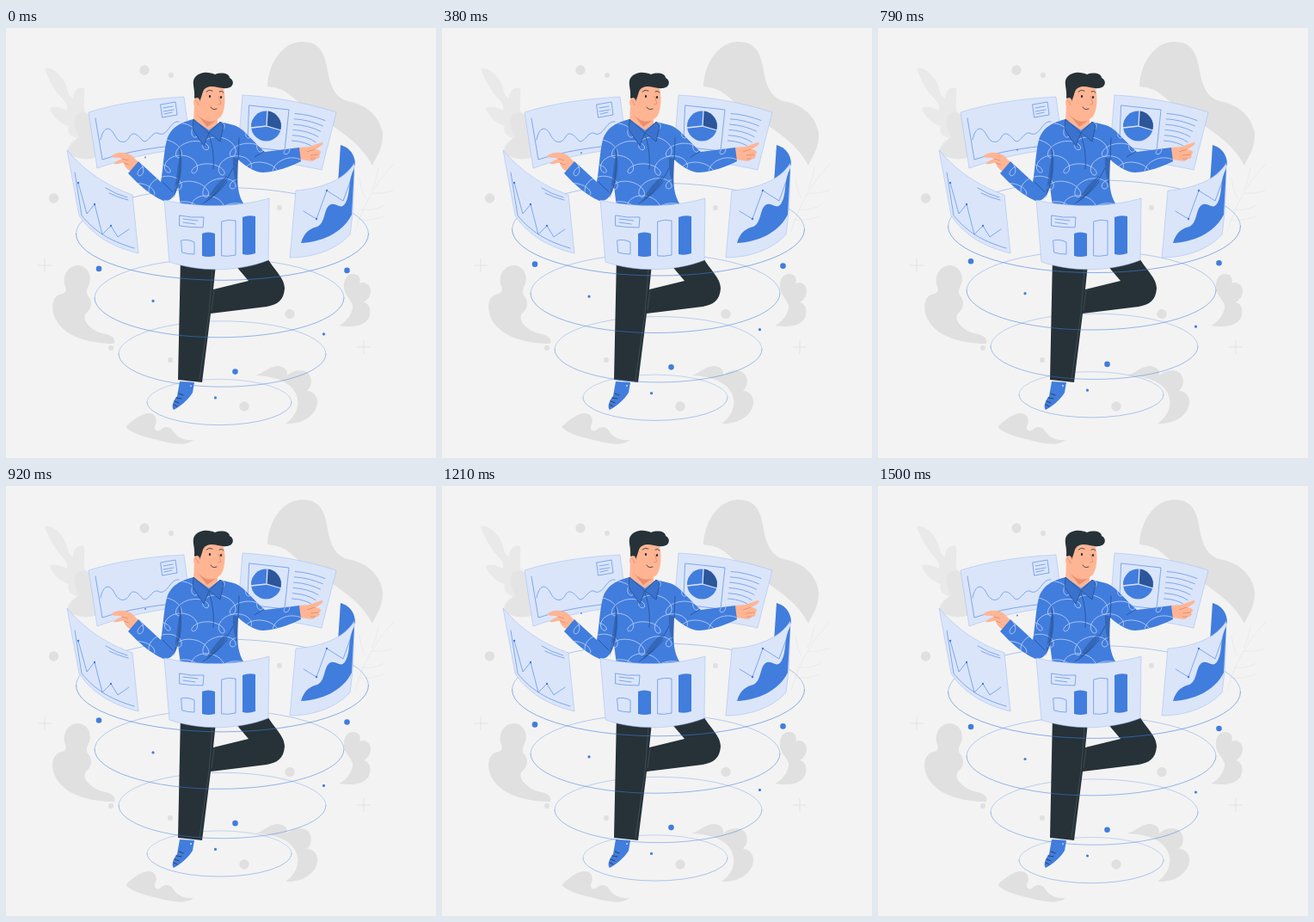
Write an HTML page that moves like this. It is 500x500 px and loops after 1540 ms.

```html
<!DOCTYPE html>
<html lang="en">
<head>
<meta charset="utf-8">
<title>Dashboard rings</title>
<style>
  html, body { margin: 0; height: 100%; overflow: hidden; background: #f3f3f3; }
  svg { display: block; width: 100vw; height: 100vh; }
  .panel { fill: #dae5fa; stroke: #9bb9ee; stroke-width: .5; }
  .line { fill: none; stroke: #417ddd; stroke-width: .6; stroke-linejoin: round; stroke-linecap: round; }
  .dots { fill: none; stroke: #417ddd; stroke-linecap: round; }
  .blue { fill: #417ddd; }
  .shade { fill: #2c5699; }
  .skin { fill: #ffb594; }
  .dark { fill: #263238; }
  .ink { fill: none; stroke: #263238; stroke-width: .8; stroke-linecap: round; }
  .crease { fill: none; stroke: #24518f; stroke-width: .8; stroke-linecap: round; }
  .blush { fill: none; stroke: #dd8368; stroke-width: .7; }
</style>
</head>
<body>
<svg viewBox="0 0 500 500" xmlns="http://www.w3.org/2000/svg">
  <clipPath id="shirtClip"><use href="#shirt"/></clipPath>

  <!-- Backdrop -->
  <g fill="#e0e0e0">
    <path d="M304 68C305 40 322 17 343 16C365 15 371 30 374 50C377 70 385 82 397 85C416 88 434 100 438 122C439 140 430 150 426 160C420 148 408 134 394 124C376 110 350 96 333 80C322 70 312 69 304 68Z"/>
    <path d="M126 367C100 367 75 361 62 345C50 330 52 310 66 309C70 307 71 304 68 298C66 285 74 276 84 276C95 277 100 288 97 297C94 304 92 308 96 312C102 320 98 328 93 332C87 340 100 352 112 355C122 357 128 360 126 367Z"/>
    <path d="M387 346C396 342 402 333 403 325C404 318 394 312 393 303C392 292 397 286 403 286C411 286 413 292 411 297C418 294 424 299 424 306C424 313 420 316 416 319C424 321 425 330 422 337C416 348 400 348 387 346Z"/>
    <path d="M290 404C300 401 305 394 315 393C324 393 328 398 327 404C336 396 350 397 353 404C357 411 354 418 350 422C358 422 363 429 362 437C360 450 346 461 325 460C337 452 343 438 337 425C330 410 310 405 290 404Z"/>
    <path d="M139 464C148 455 158 448 166 448C174 448 177 456 173 463C172 468 176 470 180 467C184 463 190 463 194 468C198 476 208 480 218 479C210 486 195 484 180 480C165 476 150 474 139 464Z"/>
  </g>
  <g class="dots" style="stroke:#e0e0e0">
    <path stroke-width="11.4" d="M161 49h0M55.5 198h0M330 332.5h0M277 440h0"/>
    <path stroke-width="6" d="M192 55h0M318 209h0M122 372h0M191 386h0"/>
  </g>
  <path fill="#e9e9e9" d="M45 47C52 44 67 55 71 70C72 77 75 81 78 82C78 73 84 68 91 70C92 79 90 87 91 96C97 101 104 110 105 150C94 155 79 152 72 145C70 137 78 131 83 128C73 126 71 119 73 114C64 112 54 103 51 93C57 90 65 93 71 96C73 88 66 83 60 76C53 66 48 57 45 47Z"/>
  <path fill="#e4e4e4" d="M83 100C92 96 99 100 104 110L106 150C94 155 77 151 72 143C75 135 80 131 86 127C78 118 78 106 83 100Z"/>
  <g fill="none" stroke="#ebebeb">
    <path d="M451 158C430 180 416 204 406 237M425 188C429 181 432 171 433 162M418 198C414 191 412 182 411 174M425 192C435 193 445 191 451 188M413 211C423 212 432 211 440 206M409 223C419 224 429 223 439 219"/>
    <path stroke="#dfdfdf" stroke-width=".8" d="M37 276h16m-8-8v16M408 371h16m-8-8v16"/>
  </g>

  <g class="float" id="backRings"></g>

  <!-- Rear panels -->
  <path class="panel" d="M96 98C130 87 170 82 207 80L215 140C175 143 140 151 106 163Z"/>
  <path class="line" d="M104 105L112 153C140 144 170 139 204 136M110 130C113 114 121 114 126 124C132 136 140 134 144 126C148 119 155 126 158 130C164 137 169 121 176 122C188 129 190 107 201 109M180 89L197 86L199 101L182 104ZM183 93L194 91M183 97L195 95M184 100L193 98"/>
  <path class="panel" d="M275 78C312 80 350 87 384 98L367 165C335 158 304 153 269 151Z"/>
  <path class="line" d="M283 90L329 95L324 143L281 138Z"/>
  <path class="line" id="textLines"/>
  <circle class="blue" cx="302.5" cy="114" r="17.5"/>
  <path class="shade" d="M303 114L304 96.500A17.500 17.500 0 0 1 319 119Z"/>
  <path fill="none" stroke="#dae5fa" stroke-width="1.300" d="M304 96L303 114L320 119M303 114L285 116"/>

  <!-- Legs -->
  <path class="dark" d="M203 265H245L241 304L282 294L265 274L303 266C311 281 324 290 324 303C323 317 315 322 303 324L238 332L228 412L200 409Z"/>
  <path fill="none" stroke="#536069" stroke-width=".5" d="M240 281L236 331L225 409M242 305L239 328"/>
  <path class="blue" d="M202 411L219 412L217 424C212 432 203 440 195 444C192 441 194 434 199 428Z"/>
  <path class="ink" d="M201 425l5 2M198 430l6 1M196 434l5 2M195 438l4 2"/>
  <path class="dots" style="stroke:#cbdcf8" stroke-width="2" d="M215 416h0"/>

  <!-- Hands and neck -->
  <path class="skin" d="M155 157L146 148C139 144 130 143 122 149C125 152 131 150 135 152C132 153 128 155 125 158C131 159 134 156 137 157C138 162 142 166 147 167Z"/>
  <path class="skin" d="M340 139L353 138L367 133C371 134 367 137 360 141C366 142 368 145 364 147C366 150 363 153 360 152C357 157 352 154 342 153Z"/>
  <path class="blush" d="M135 152l7 2M137 157l6 2M359 141l-9 3M364 147l-10 1M360 152h-6"/>
  <path class="skin" d="M219 88H246V112L236 120L218 110Z"/>

  <!-- Shirt -->
  <path id="shirt" class="blue" d="M218 106C203 110 192 115 187 130C183 146 183 163 180 179L154 155L142 169C154 182 169 195 183 201C191 202 197 196 200 184L203 208H279C269 196 268 180 270 153C279 161 289 168 299 168C315 167 331 161 343 155L341 139L301 144C287 132 276 116 265 113L249 109L236 119Z"/>
  <path id="swirls" clip-path="url(#shirtClip)" fill="none" stroke="#c3d5f6" stroke-width=".8"/>
  <path class="crease" d="M236 124C241 138 242 152 241 164M202 139Q204 165 199 186M182 179l12 12M271 128L270 153M264 163Q252 187 239 196M299 144l-10 6M229 204Q247 193 257 179"/>
  <path class="shade" opacity=".55" d="M203 140Q207 166 200 185L195 198C197 179 200 160 203 140ZM270 152L269 184Q263 169 264 150ZM258 171Q248 192 232 203Q242 181 258 171Z"/>
  <path fill="#3a72cd" stroke="#24518f" stroke-width=".8" d="M218 106L217 118L230 137L236 122ZM249 109L253 114L249 132L236 122Z"/>

  <!-- Head -->
  <path fill="#e98f70" d="M222 100C230 109 238 110 245 107L234 115Z"/>
  <path class="skin" d="M225 70L252 66C256 80 255 95 250 103C244 110 231 106 225 97Z"/>
  <path class="dark" d="M219 81C220 70 215 63 220 57C226 50 237 51 243 54C251 51 260 53 260 58C266 61 265 69 257 70C248 71 241 66 234 69C228 71 229 77 226 83L225 89Z"/>
  <ellipse class="skin" cx="222" cy="87" rx="4" ry="6"/>
  <path class="blush" d="M220 84Q223 85 224 90M247 79Q249 85 250 88L246 89"/>
  <path class="dots" style="stroke:#263238" stroke-width="2.200" d="M237 79v1M250 80v1"/>
  <path class="ink" d="M233 74Q236 71 240 73M248 74Q251 72 253 75M238 92Q240 96 245 94"/>

  <g class="float">
    <g id="frontRings"></g>
    <path class="dots" stroke-width="6.600" d="M108 280h0M396.500 282h0M266.500 399.700h0"/>
    <path class="dots" stroke-width="3.200" d="M171 317.500h0M369.500 356h0M243.500 430h0"/>
    <path class="dots" stroke-width="1.800" d="M162 150.500h0"/>
  </g>

  <!-- Side panels -->
  <path class="panel" d="M71 142C92 167 118 184 147 194L154 262C125 255 101 242 85 218Z"/>
  <path class="line" d="M80 168L88 218C105 239 125 249 149 256M84 180L94 216L103 205L112 240L122 230L130 243L143 234M116 186Q127 193 141 197M120 192Q130 197 142 200"/>
  <path class="blue" d="M389 136C400 139 406 148 406 159L386 181Z"/>
  <path class="panel" d="M337 189C366 187 393 177 405 157C404 183 405 207 400 240C384 258 357 267 330 267Z"/>
  <path class="blue" d="M343 250C347 236 355 233 362 231C372 227 369 208 378 205C386 203 389 213 395 203C401 192 397 178 405 163L402 217C391 239 366 249 343 250Z"/>
  <path class="line" d="M346 213L361 222L373 189L392 201L404 168"/>
  <path class="dots" stroke-width="2.400" d="M361 222h0M373 189h0M84 180h0M103 205h0M122 230h0"/>

  <!-- Front panel -->
  <path class="panel" d="M184 200C221 209 268 209 306 198L305 270C270 284 225 284 190 272Z"/>
  <path class="line" d="M202 218Q215 221 230 220L229 232Q215 232 202 230ZM206 222l17 2M206 226l14 2M204 247Q211 245 219 249V263Q211 263 205 261ZM251 225Q258 222 267 224V264Q258 266 251 265Z"/>
  <path class="blue" d="M228 239Q235 236 243 239V265Q235 267 228 265ZM275 220Q282 217 290 219V262Q282 265 275 263Z"/>
</svg>
<script>
  const LOOP_MS = 1540, LEAD_MS = 50, LIFT = 9, FLATNESS = .317;
  const byId = id => document.getElementById(id);
  const repeat = (count, make) => Array.from({ length: count }, (_, i) => make(i)).join('');

  // Ellipses shrink towards the floor; the far half goes behind the figure.
  const radii = [170, 145, 120.5, 84];
  const halfRings = sweep => repeat(radii.length, i => {
    const rx = radii[i], left = 251.5 - 3.5 * (i % 2) - rx;
    const y = 239.5 + 79 * i - 4.6 * i * i;
    const alpha = (1 - .1 * i) * (sweep ? .65 : 1);
    return `<path class="line" opacity="${alpha}" d="M${left} ${y}a${rx} ${rx * FLATNESS} 0 0 ${sweep} ${2 * rx} 0"/>`;
  });
  byId('backRings').innerHTML = halfRings(1);
  byId('frontRings').innerHTML = halfRings(0);

  byId('textLines').setAttribute('d', repeat(6, i =>
    `M${336 - .7 * i} ${99.5 + 6.3 * i}q17 1 ${35 - 2 * i} 8`));

  // Rows of looping thread, clipped to the shirt
  const swirlRow = row => repeat(180, i => {
    const turn = i / 4;
    const x = 125 + 13 * (row % 2) + 5 * turn - 10 * Math.sin(turn);
    const y = 115 + 23 * row + 8 * Math.cos(turn) + 5 * Math.sin(turn * .45 + row * 2);
    return `${i ? 'L' : 'M'}${x.toFixed(1)} ${y.toFixed(1)}`;
  });
  byId('swirls').setAttribute('d', repeat(5, swirlRow));

  const floating = document.querySelectorAll('.float');
  function draw(now) {
    const phase = (now + LEAD_MS) / LOOP_MS * 2 * Math.PI;
    const y = -LIFT / 2 * (1 - Math.cos(phase));
    floating.forEach(group => group.setAttribute('transform', `translate(0 ${y.toFixed(3)})`));
    requestAnimationFrame(draw);
  }
  draw(performance.now());
</script>
</body>
</html>
```
